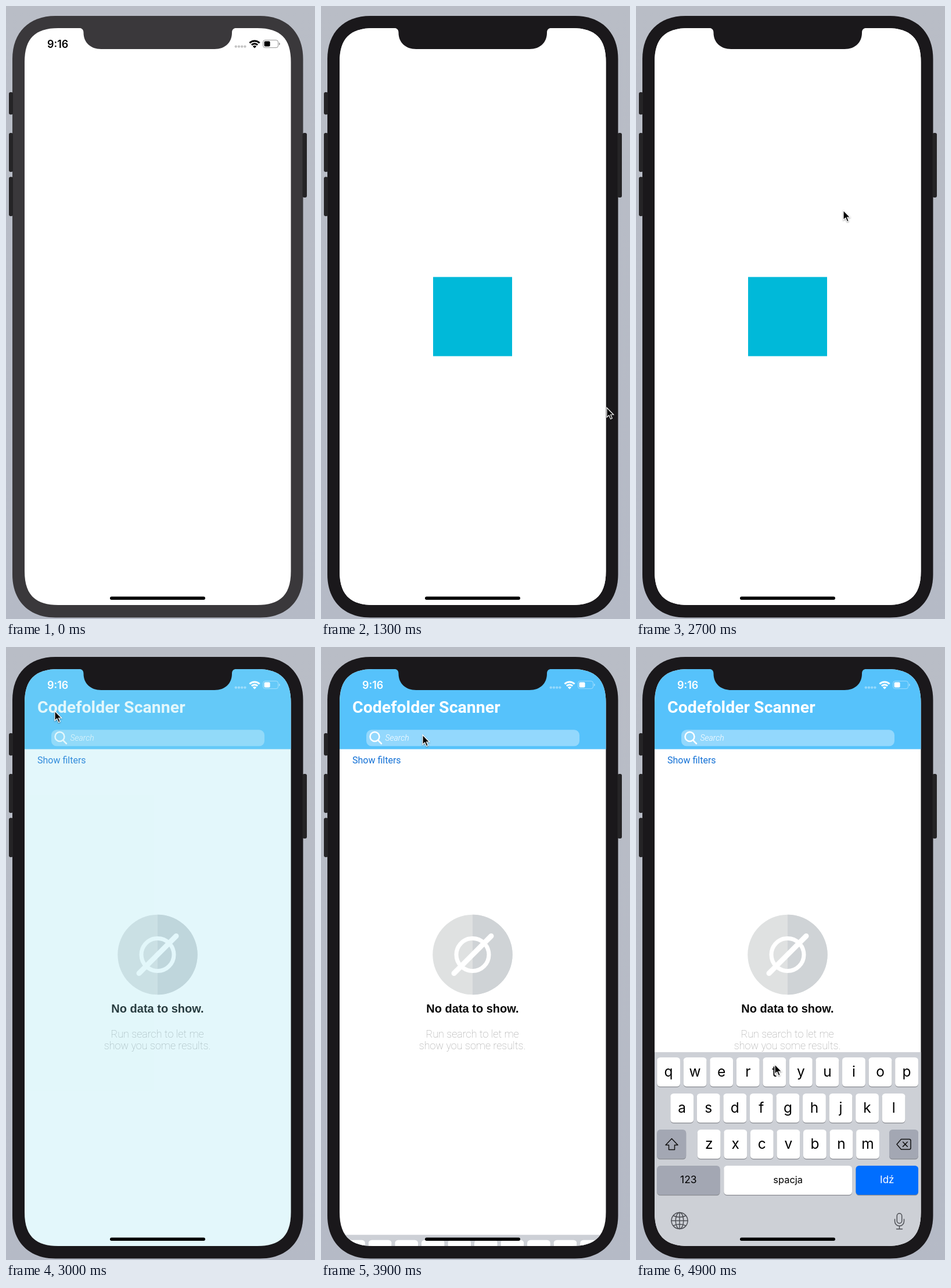
Recreate the animation shown at these times as an HTML page. Size 532 by 1053 pixels, loop 5 s.

```html
<!DOCTYPE html>
<html lang="en">
<head>
<meta charset="utf-8">
<title>Phone app launch</title>
<style>
  html, body { margin: 0; width: 100%; height: 100%; overflow: hidden; background: #b8bdc7; }
  svg { display: block; width: 100vw; height: 100vh; }
  text { white-space: pre; }
  .ui { font-family: Inter, sans-serif; }
  .app { font-family: Roboto, sans-serif; }
  .mid { text-anchor: middle; }
  .line { fill: none; stroke-linecap: round; stroke-linejoin: round; }
</style>
</head>
<body>
<svg viewBox="0 0 532 1053" preserveAspectRatio="none">
  <defs>
    <linearGradient id="wall" x2="0" y2="1">
      <stop stop-color="#b9bdc6"/><stop offset="1" stop-color="#b5bac6"/>
    </linearGradient>
    <clipPath id="glass"><path id="screen"/></clipPath>
  </defs>
  <rect width="532" height="1053" fill="url(#wall)"/>
  <path id="bezel"/>
  <g fill="#252426">
    <rect x="5" y="148" width="7" height="38.5" rx="3"/>
    <rect x="5" y="218" width="7" height="67" rx="3"/>
    <rect x="5" y="293.5" width="7" height="67.5" rx="3"/>
    <rect x="510.5" y="218" width="7.5" height="111" rx="3"/>
  </g>

  <g clip-path="url(#glass)">
    <rect x="32" y="38" width="459" height="992" fill="#fff"/>

    <g id="main" class="app">
      <rect x="32" y="38" width="459" height="137.5" fill="#56c2fb"/>
      <text x="54" y="113" font-size="28.5" font-weight="700" fill="#fff">Codefolder Scanner</text>
      <rect x="78" y="142.3" width="367" height="28" rx="9" fill="#fff" opacity=".36"/>
      <path class="line" d="M98.5 160.5L104 166M100.5 154a8 8 0 1 0-16 0a8 8 0 1 0 16 0" stroke="#fff" stroke-width="2.5"/>
      <text x="110.5" y="161" font-size="14" font-weight="300" font-style="italic" fill="#fff">Search</text>
      <text x="54" y="200" font-size="16" fill="#1371d6">Show filters</text>
      <circle cx="261" cy="528.5" r="68.7" fill="#dfe1e1"/>
      <path d="M261 459.8a68.7 68.7 0 0 1 0 137.4z" fill="#cfd3d6"/>
      <circle cx="261" cy="528.5" r="28" fill="none" stroke="#fff" stroke-width="7"/>
      <path class="line" d="M229 560.5L293 496.5" stroke="#fff" stroke-width="9"/>
      <text class="mid" x="261" y="628" font-size="20" font-weight="700" fill="#050505" style="font-family:'Liberation Sans',sans-serif">No data to show.</text>
      <g class="mid" font-size="18" font-weight="100" fill="#a0a0a0">
        <text x="260.5" y="671">Run search to let me</text>
        <text x="260.5" y="691">show you some results.</text>
      </g>
    </g>

    <g id="keyboard" class="ui mid">
      <rect x="32" y="696" width="459" height="340" fill="#cdd0d6"/>
      <g id="keys"></g>
      <g class="line" stroke="#111" stroke-width="1.5">
        <path d="M61.5 844.5L72 855.5H66.5V863.5H56.5V855.5H51z"/>
        <path d="M449 854.3L456.5 845.5H470.5Q473 845.5 473 848V860.5Q473 863 470.5 863H456.5zM459.5 850.3l7.8 7.8m0-7.8l-7.8 7.8"/>
      </g>
      <g class="line" stroke="#4d4f55" stroke-width="1.5">
        <circle cx="75" cy="985.5" r="14"/>
        <ellipse cx="75" cy="985.5" rx="6.8" ry="14"/>
        <path d="M75 971.5v28M61 985.5h28M64.5 977q10.500 5 21 0M64.500 994q10.500-5 21 0"/>
        <rect x="449.300" y="973" width="8.400" height="17" rx="4.200"/>
        <path d="M445.500 983v3.500a8 8 0 0 0 16 0V983M453.500 994.500v5M448.500 999.700h10"/>
      </g>
    </g>

    <g id="splash">
      <rect x="32" y="38" width="459" height="992" fill="#fff"/>
      <rect id="tile" x="-68" y="-68" width="136" height="136" fill="#00b9d9"/>
    </g>

    <g id="status" fill="currentColor">
      <text class="ui" x="71" y="71.700" font-size="18" font-weight="600">9:16</text>
      <g id="dots"></g>
      <path id="wifi" fill="none" stroke="currentColor" stroke-width="3"/>
      <path d="M428 72.500l-3.200-3.300a4.600 4.600 0 0 1 6.400 0z"/>
      <rect x="442.600" y="58.600" width="26" height="13" rx="3.600" fill="none" stroke="currentColor" opacity=".42"/>
      <path d="M470 62.700a2.500 2.500 0 0 1 0 4.800z" opacity=".45"/>
      <rect x="444.600" y="60.600" width="10" height="9" rx="1.800"/>
    </g>
    <rect x="179" y="1014.500" width="164" height="5.500" rx="2.700" fill="#000"/>
  </g>
  <path id="notch" d="M125 37.500C131 38 133.500 40.500 133.500 46C133.500 62 145 74 164 74H359C378 74 389 62 389 46C389 40.500 391.500 38 397.500 37.500z"/>
  <path id="cursor" d="M0 0V16.500L3.800 13L6.600 19.500L9.300 18.300L6.600 12H11.700z" fill="#000" stroke="#fff" stroke-width="1.200" style="filter:drop-shadow(0 1px 1px #0006)"/>
</svg>
<script>
const LOOP = 5000, STEP = 100;
const SPLASH = 1300, ZOOM = 2700, ZOOM_TIME = 400;
const $ = id => document.getElementById(id);
const clamp = v => Math.max(0, Math.min(1, v));
const smooth = v => v * v * (3 - 2 * v);
const show = (el, on) => el.style.display = on ? '' : 'none';

// Rounded box with continuous corners: r is the corner reach, c its handle inset.
function squircle(x, y, w, h, r, c) {
  const X = x + w, Y = y + h;
  return `M${x + r} ${y}H${X - r}C${X - c} ${y} ${X} ${y + c} ${X} ${y + r}` +
    `V${Y - r}C${X} ${Y - c} ${X - c} ${Y} ${X - r} ${Y}` +
    `H${x + r}C${x + c} ${Y} ${x} ${Y - c} ${x} ${Y - r}` +
    `V${y + r}C${x} ${y + c} ${x + c} ${y} ${x + r} ${y}z`;
}
$('bezel').setAttribute('d', squircle(11, 17, 500.5, 1033.5, 74, 28.5));
$('screen').setAttribute('d', squircle(32, 38, 458.5, 991, 58, 18));

$('dots').innerHTML = [0, 1, 2, 3]
  .map(i => `<circle cx="${395.8 + i * 5.2}" cy="69.6" r="2.200"/>`).join('');
const arc = r => {
  const d = r * Math.SQRT1_2;
  return `M${428 - d} ${72 - d}A${r} ${r} 0 0 1 ${428 + d} ${72 - d}`;
};
$('wifi').setAttribute('d', arc(12) + arc(7.2));

function key(x, y, w, label = '', size = 24.5, fill = '#fff', ink = '#000') {
  const base = y + (size > 20 ? 32.5 : 30);
  return `<rect x="${x}" y="${y + 1.3}" width="${w}" height="50" rx="5.500" fill="#898b91"/>` +
    `<rect x="${x}" y="${y}" width="${w}" height="50" rx="5.500" fill="${fill}"/>` +
    `<text x="${x + w / 2}" y="${base}" font-size="${size}" fill="${ink}">${label}</text>`;
}
const row = (letters, x, y) =>
  [...letters].map((ch, i) => key(x + i * 45.55, y, 39.8, ch)).join('');
const GREY = '#a3a7b3';
$('keys').innerHTML =
  row('qwertyuiop', 36.2, 705) + row('asdfghjkl', 59.3, 767) + row('zxcvbnm', 105.8, 829) +
  key(36.2, 829, 50, '', 18, GREY) + key(436, 829, 50, '', 18, GREY) +
  key(36.2, 891, 108.3, '123', 17.5, GREY) + key(151.3, 891, 220.7, 'spacja', 16.5) +
  key(378.5, 891, 107.5, 'Idź', 17, '#006eff', '#fff');

// Pointer stops: time, x, y. Each list is one visible stretch.
const paths = [
  [[700, 434.5, 726], [1000, 434.5, 726], [1300, 492, 690], [1399, 492, 690]],
  [[2200, 336, 584], [2700, 357, 351], [3000, 84, 110], [3400, 175, 151],
   [4200, 175, 151], [4800, 239, 717], [5000, 239, 717]]
];
function pointer(t) {
  const p = paths.find(q => t >= q[0][0] && t <= q[q.length - 1][0]);
  if (!p) return null;
  const i = Math.max(1, p.findIndex(s => s[0] >= t));
  const [a, b] = [p[i - 1], p[i]];
  const k = smooth(clamp((t - a[0]) / (b[0] - a[0])));
  return [a[1] + (b[1] - a[1]) * k, a[2] + (b[2] - a[2]) * k];
}

function draw(t) {
  const shell = t < 100 ? '#3a383b' : t < 200 ? '#29272a' : '#1a181b';
  $('bezel').setAttribute('fill', shell);
  $('notch').setAttribute('fill', shell);

  const u = clamp((t - ZOOM) / ZOOM_TIME);
  show($('main'), u > 0);
  show($('splash'), t >= SPLASH && u < 1);
  $('splash').setAttribute('opacity', 1 - u);
  const swing = t > 1600 && t < 2600 ? 3.7 * Math.sin((t - 1600) / 500 * 2 * Math.PI) : 0;
  $('tile').setAttribute('transform',
    `translate(261 533.500) rotate(${swing}) scale(${1 + 25 * u * u})`);
  $('tile').setAttribute('opacity', 1 - u * u);

  show($('status'), t < SPLASH || u > 0);
  $('status').style.color = u > 0 ? '#fff' : '#000';
  $('dots').setAttribute('opacity', u > 0 ? .38 : .23);

  const rise = smooth(clamp((t - 3840) / 400));
  show($('keyboard'), rise > 0);
  $('keyboard').setAttribute('transform', `translate(0 ${334 * (1 - rise)})`);

  const at = pointer(t);
  show($('cursor'), at);
  if (at) $('cursor').setAttribute('transform', `translate(${at})`);
}

const start = performance.now();
function tick() {
  const t = (performance.now() - start) % LOOP;
  draw(Math.floor(t / STEP) * STEP);
  requestAnimationFrame(tick);
}
draw(0);
requestAnimationFrame(tick);
</script>
</body>
</html>
```
